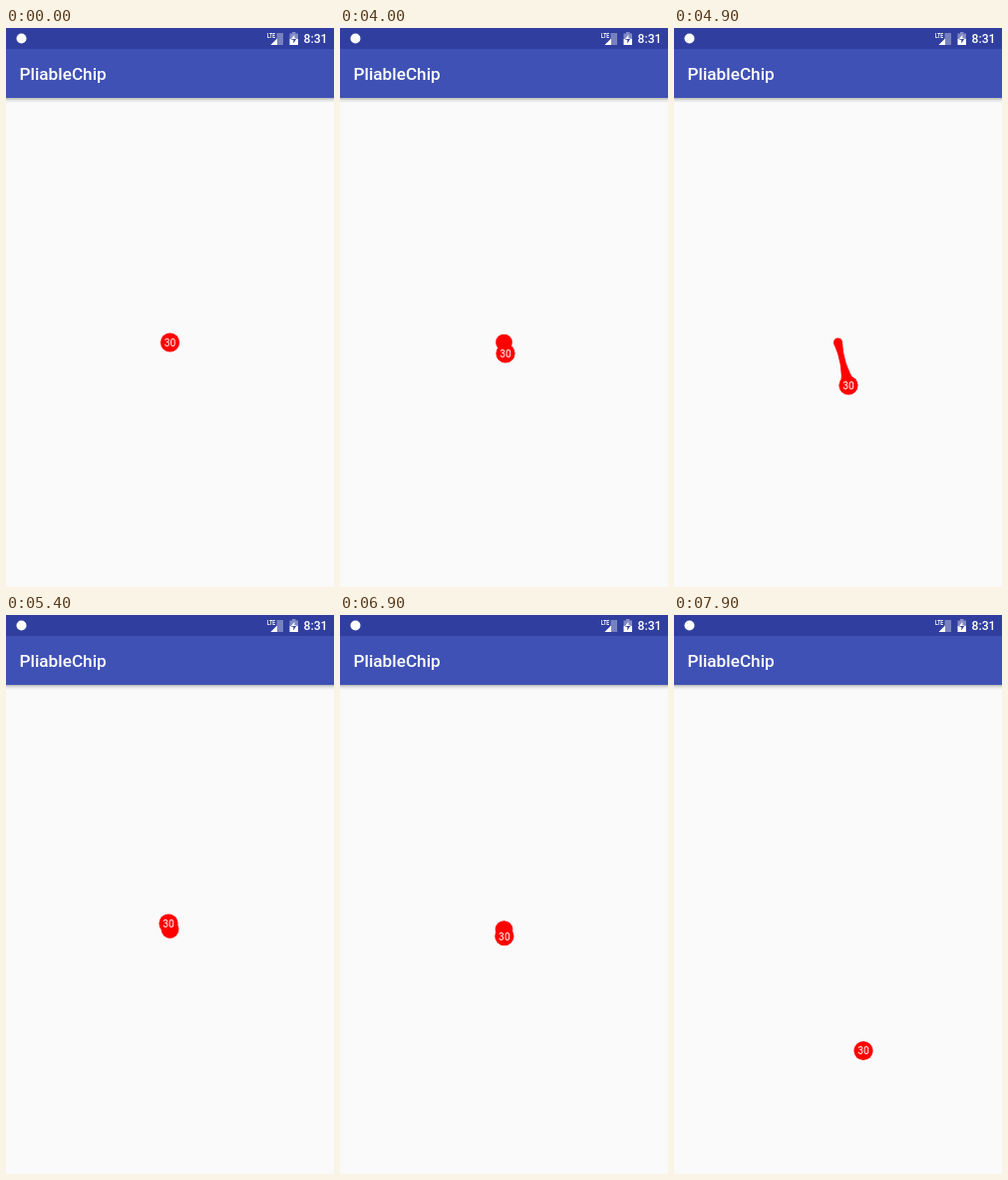
Recreate the animation shown at these times as an HTML page. Size 329 px wide and 560 px high, loop 8 s.

```html
<!DOCTYPE html>
<html lang="en">
<head>
<meta charset="utf-8">
<title>Elastic badge</title>
<style>
  html, body { margin: 0; width: 100%; height: 100%; overflow: hidden; background: #fafafa; }
  svg { display: block; width: 100vw; height: 100vh; }
  text { font-family: Roboto, sans-serif; fill: #fff; }
</style>
</head>
<body>
<svg viewBox="0 0 329 560">
  <defs>
    <linearGradient id="shade" x2="0" y2="1">
      <stop offset="0" stop-color="#000" stop-opacity=".3"/>
      <stop offset=".4" stop-color="#000" stop-opacity=".1"/>
      <stop offset="1" stop-color="#000" stop-opacity="0"/>
    </linearGradient>
  </defs>

  <rect width="329" height="560" fill="#fafafa"/>
  <rect y="70" width="329" height="5" fill="url(#shade)"/>
  <rect y="21" width="329" height="49" fill="#3f51b5"/>
  <rect width="329" height="21" fill="#303f9f"/>

  <circle cx="15.5" cy="10.5" r="5" fill="#fff"/>
  <g fill="#fff">
    <path d="M278 5V17H265.5L271.5 11V5Z" opacity=".35"/>
    <path d="M265.5 17L272 10.5V17Z"/>
    <text x="262" y="10" font-size="6.5" font-weight="700" textLength="8" lengthAdjust="spacingAndGlyphs">LTE</text>
    <path d="M284.5 5.5H287V4H290.5V5.5H293V11H284.5Z" opacity=".4"/>
    <path d="M284.5 11H293V17H284.5Z"/>
    <path d="M289.5 6.5L286 11.7H288.3V15.5L291.6 10.3H289.5Z" fill="#303f9f"/>
    <path d="M289.5 6.5L286 11H291.2L291.6 10.3H289.5Z"/>
  </g>
  <text x="298.5" y="15.2" font-size="12.2" font-weight="500">8:31</text>
  <text x="13.5" y="52" font-size="17.2" font-weight="500">PliableChip</text>

  <g fill="#f00">
    <g id="tether">
      <circle id="anchor" cx="164.5" cy="315"/>
      <path id="bridge"/>
    </g>
    <g id="badge">
      <circle r="9.6"/>
      <text y="3.8" font-size="10.3" text-anchor="middle">30</text>
    </g>
  </g>
</svg>
<script>
const LOOP = 8000, STEP = 100;
const HOME = { x: 164.5, y: 315 };
const RADIUS = 9.6, SNAP = 60;

// [time, x, y]: drag and spring back, then drag until the tether snaps
const keys = [
  [0, HOME.x, HOME.y], [3900, HOME.x, HOME.y],
  [4000, 166, 326], [4100, 166, 326],
  [4400, 170.5, 337.5], [4600, 170.5, 337.5],
  [4900, 175, 358], [5000, 176, 361], [5200, 176, 361.5],
  [5300, 167, 326], [5400, 163, 309], [5500, 164.2, 314],
  [5600, HOME.x, HOME.y], [6600, HOME.x, HOME.y],
  [7000, 165, 324], [7300, 166.5, 340.5], [7500, 171, 362],
  [7700, 182, 406], [7900, 190, 436.5], [LOOP, 190, 436.5]
];

const el = id => document.getElementById(id);
const tether = el('tether'), anchor = el('anchor'), bridge = el('bridge'), badge = el('badge');
const mix = (a, b, u) => a + (b - a) * u;

function positionAt(t) {
  const i = keys.findIndex(k => k[0] > t);
  const [t0, x0, y0] = keys[i - 1], [t1, x1, y1] = keys[i];
  const u = (t - t0) / (t1 - t0);
  return { x: mix(x0, x1, u), y: mix(y0, y1, u) };
}

function bridgePath(p, dist, rootWidth, tipWidth) {
  const nx = (HOME.y - p.y) / dist, ny = (p.x - HOME.x) / dist;
  const side = (c, w) => `${c.x + nx * w} ${c.y + ny * w}`;
  const mid = `${(HOME.x + p.x) / 2} ${(HOME.y + p.y) / 2}`;
  return `M${side(HOME, rootWidth)}Q${mid} ${side(p, tipWidth)}` +
    `L${side(p, -tipWidth)}Q${mid} ${side(HOME, -rootWidth)}Z`;
}

function draw(time) {
  const t = Math.floor(time % LOOP / STEP) * STEP;
  const p = positionAt(t);
  const dist = Math.hypot(p.x - HOME.x, p.y - HOME.y);
  badge.setAttribute('transform', `translate(${p.x} ${p.y})`);

  const joined = dist > 0 && dist < SNAP;
  tether.setAttribute('visibility', joined ? 'visible' : 'hidden');
  if (!joined) return;
  const r = RADIUS - dist * 0.115;
  anchor.setAttribute('r', r);
  bridge.setAttribute('d', bridgePath(p, dist, r, 7.8));
}

let start;
function frame(now) {
  start ??= now;
  draw(now - start);
  requestAnimationFrame(frame);
}
draw(0);
requestAnimationFrame(frame);
</script>
</body>
</html>
```
